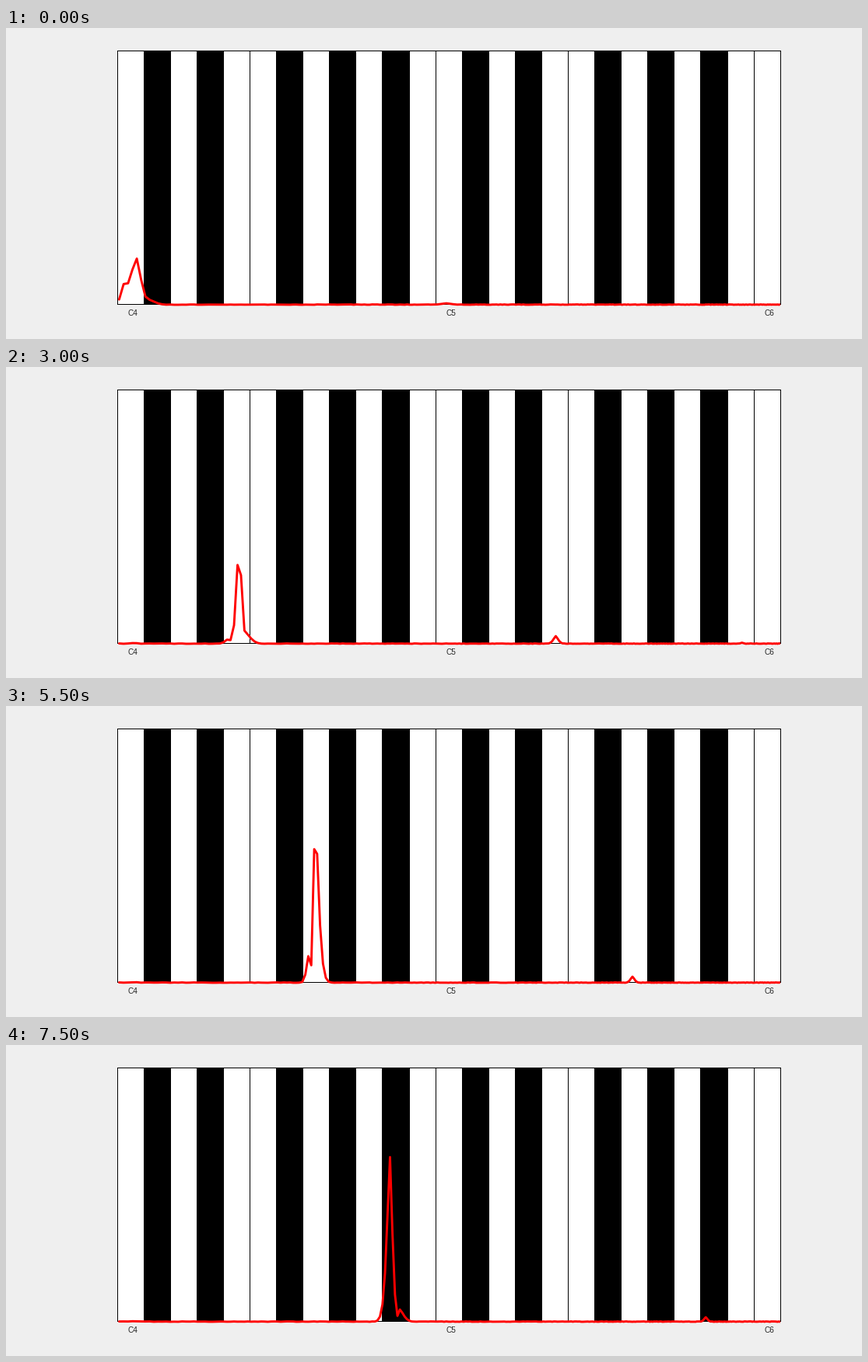
These frames come from a looping animation (1100 px wide and 400 px high, 8000 ms). A matplotlib script:

```python
import numpy as np
import matplotlib.pyplot as plt
from matplotlib.animation import FuncAnimation
from matplotlib.patches import Rectangle

W, H, DPI = 1100, 400, 100
PX = 72 / DPI
LEFT, RIGHT, TOP, BASE = 143, 995, 29, 355
N_KEYS = 25
KEY = (RIGHT - LEFT) / N_KEYS
BLACK = {1, 3, 6, 8, 10}
FRAMES, INTERVAL, STEPS = 16, 500, 4

# Spectrum bins are 2.5 Hz wide and drawn on a logarithmic pitch axis.
BINS = np.arange(102, 433)
BIN_X = LEFT + 2.4 + 12 * KEY * np.log2(BINS / BINS[0])

# Lobes are (bin, relative height, left width, right width). Each note has an
# unsteady attack, then a held tone; levels are its peak heights step by step.
NOTES = [
    dict(levels=(59.5, 67.5, 82.5, 58.5), overtone=(208, 5),
         attack=[(106, 1, 2.4, 1.4), (103, .45, .8, 1.5), (109, .11, 1, 1.8)],
         held=[(105.4, 1, 1.3, 1.2)]),
    dict(levels=(54, 93.5, 101.5, 85), overtone=(264, 10),
         attack=[(133.2, 1, 3.8, 1.5), (136.5, .07, 1, 1.5)],
         held=[(132.45, 1, 1, .95), (134.5, .1, 1, 1.9), (129.5, .05, 1.3, 1)]),
    dict(levels=(158.5, 193, 193, 172), overtone=(312, 8),
         attack=[(156.6, 1, 1.5, 1.2), (159, .34, .4, .8),
                 (161, .155, 1, 3.4), (153.3, .11, 1, 2)],
         held=[(156.3, 1, .75, 1.6), (154, .155, .9, .4)]),
    dict(levels=(129.5, 270.5, 229, 212), overtone=(366, 6),
         attack=[(183, 1, 2.3, 1.8), (186, .24, 1, 2.7),
                 (191, .06, 2, 3), (175.5, .028, 1.5, 2)],
         held=[(184, 1, 1.75, 1.35), (188, .075, 1, 2.2)]),
]


def lobe(center, height, left, right):
    d = BINS - center
    return height * np.exp(-(np.abs(d) / np.where(d < 0, left, right)) ** 1.5)


def spectrum(i):
    note, step = NOTES[i // STEPS], i % STEPS
    tone = np.max([lobe(*p) for p in note["held" if step else "attack"]], axis=0)
    tone *= note["levels"][step] / tone.max()

    pitch, strength = note["overtone"]
    strength, width = (strength, 2) if step else (2, 3.5)
    for ratio, gain in ((1, 1), (1.5, .15)):
        tone += lobe(pitch * ratio, strength * gain, width, width)

    noise = np.random.default_rng(40 + i).uniform(.1, .6, BINS.size)
    hum = .6 * np.exp(-((BIN_X - 163) / 7) ** 2)
    return BASE + 1.1 - np.maximum(tone, noise + hum)


fig = plt.figure(figsize=(W / DPI, H / DPI), dpi=DPI, facecolor="#efefef")
ax = fig.add_axes([0, 0, 1, 1])
ax.set(xlim=(0, W), ylim=(H, 0))
ax.axis("off")


def box(x, y, w, h, color):
    ax.add_patch(Rectangle((x, y), w, h, fc=color, ec="none", lw=0))


def edge(n):
    return int(LEFT + .18 + n * KEY)


box(LEFT, TOP, RIGHT - LEFT, BASE - TOP, "white")
for n in range(N_KEYS + 1):
    is_black = n < N_KEYS and n % 12 in BLACK
    end = edge(n + 1) if is_black else edge(n)
    box(edge(n), TOP, end + 1 - edge(n), BASE - TOP, "black")
for y in (TOP, BASE):
    box(LEFT, y, RIGHT - LEFT + 1, 1, "black")

for octave in range(3):
    ax.text(LEFT + 19.6 + 12 * KEY * octave, 370.3, f"C{octave + 4}",
            family="Liberation Sans", size=10 * PX, color="#262626",
            ha="center", va="baseline")

curve, = ax.plot([], [], color="red", lw=2.9 * PX,
                 solid_joinstyle="round", solid_capstyle="round")
curve.set_clip_path(Rectangle((LEFT, 0), RIGHT - LEFT, H, transform=ax.transData))


def update(i):
    curve.set_data(BIN_X, spectrum(i))
    return curve,


anim = FuncAnimation(fig, update, frames=FRAMES, interval=INTERVAL,
                     init_func=lambda: update(0), repeat=True, repeat_delay=0)
plt.show()
```
